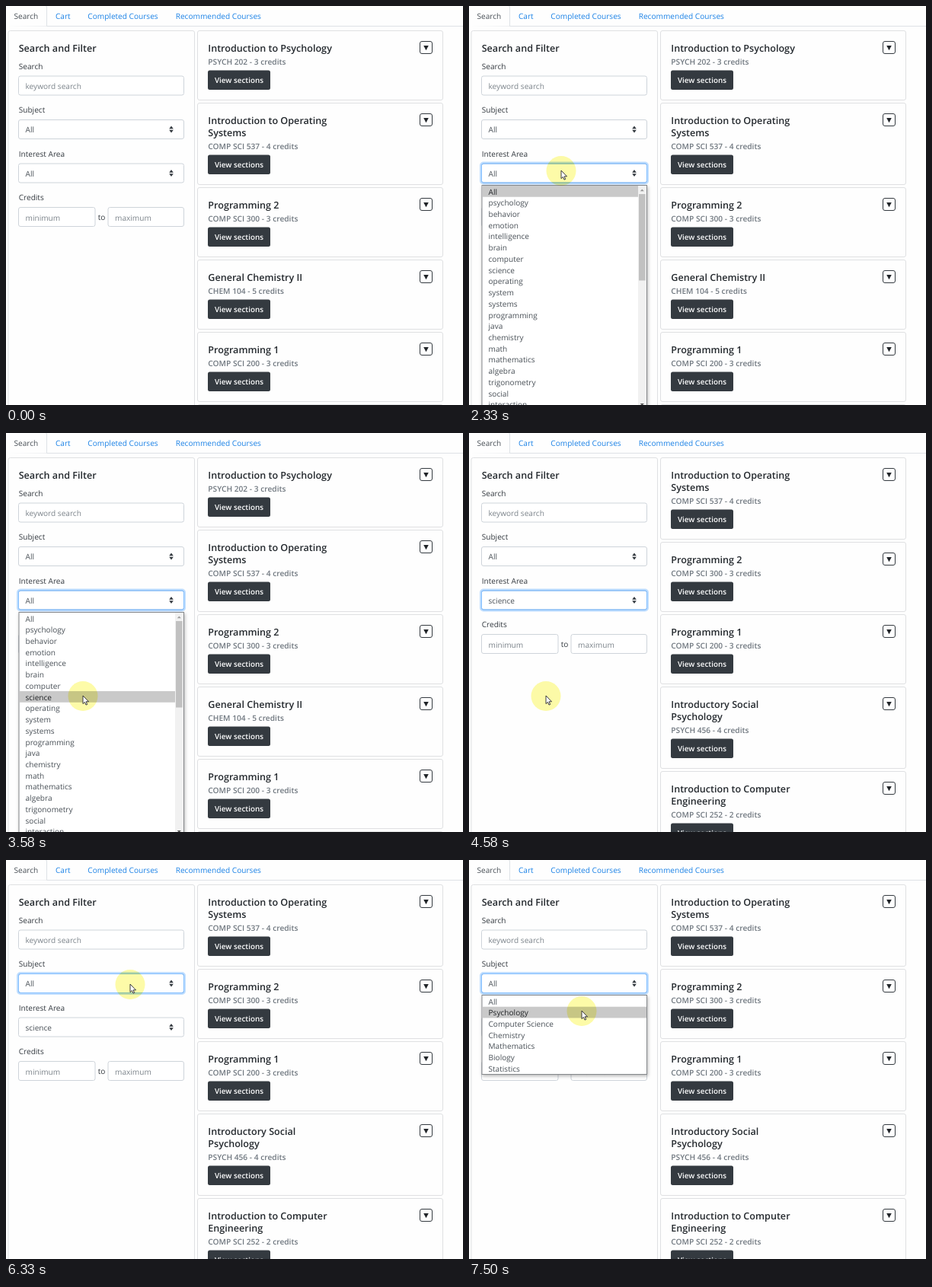
Recreate the animation shown at these times as an HTML page. Size 600 px wide and 524 px high, loop 8000 ms.

```html
<!DOCTYPE html>
<html lang="en">
<head>
<meta charset="utf-8">
<title>Course search</title>
<style>
html, body { margin: 0; width: 100%; height: 100%; overflow: hidden; background: #fefefe; }
svg { display: block; width: 600px; height: 524px; }
text { font: 10.1px "Open Sans", "Noto Sans", sans-serif; fill: #343a40; text-rendering: geometricPrecision; white-space: pre; }
.link { fill: #1b82e6; }
.soft { fill: #495057; }
.hint { fill: #7b838a; }
.head { font-size: 12.6px; font-weight: 600; fill: #24292e; }
.code { font-size: 10.2px; font-weight: 600; fill: #6f777f; }
.btn { font-size: 9.85px; font-weight: 600; fill: #fff; }
.card { fill: #fefefe; stroke: #dfe0e2; }
.field { fill: #fff; stroke: #ced4da; }
.list { filter: drop-shadow(1px 2px 2px rgba(0, 0, 0, .28)); }
</style>
</head>
<body>
<svg id="stage" viewBox="0 0 600 524"></svg>
<script>
const LOOP = 8000, TICK = 1000 / 12, ROW = 14.72;
const NS = "http://www.w3.org/2000/svg";
const stage = document.getElementById("stage");

function add(parent, tag, attrs, content) {
  const el = document.createElementNS(NS, tag);
  for (const key in attrs) el.setAttribute(key, attrs[key]);
  if (content !== undefined) el.textContent = content;
  parent.append(el);
  return el;
}
const group = (parent, attrs) => add(parent, "g", attrs);
const text = (parent, x, y, content, cls = "") => add(parent, "text", { x, y, class: cls }, content);
const rect = (parent, x, y, width, height, attrs) => add(parent, "rect", { x, y, width, height, ...attrs });
const path = (parent, d, attrs) => add(parent, "path", { d, ...attrs });
const show = (el, on) => el.setAttribute("visibility", on ? "visible" : "hidden");

function drawTabs() {
  path(stage, "M0 26.5H600", { stroke: "#dee2e6" });
  path(stage, "M-1 27V-1H50.5Q53.5 -1 53.5 2V26.5", { stroke: "#dee2e6", fill: "#fefefe" });
  text(stage, 10.5, 17, "Search", "soft");
  text(stage, 65, 17, "Cart", "link");
  text(stage, 107.3, 17, "Completed Courses", "link");
  text(stage, 222.7, 17, "Recommended Courses", "link");
}

function drawInput(x, y, w, hint) {
  rect(stage, x, y, w, 25, { rx: 2.5, class: "field" });
  text(stage, x + 9, y + 17, hint, "hint");
}

function drawSelect(y) {
  rect(stage, 16.5, y, 217, 25, { rx: 2.5, class: "field" });
  const ring = group(stage, {});
  rect(ring, 15.5, y - 1, 219, 27, { rx: 3.5, fill: "none", stroke: "#007bff", "stroke-opacity": .25, "stroke-width": 3 });
  rect(ring, 16.5, y, 217, 25, { rx: 2.5, fill: "none", stroke: "#80bdff" });
  const value = text(stage, 25.5, y + 16.7, "All", "soft");
  path(stage, `M214.2 ${y + 11.7}l2.8 -3.6 2.8 3.6zM214.2 ${y + 13.3}l2.8 3.6 2.8 -3.6z`, { fill: "#343a40" });
  return { ring, value };
}

function drawCard(parent, top, [lines, code]) {
  const extra = (lines.length - 1) * 16;
  const card = group(parent, { transform: `translate(0 ${top})` });
  rect(card, 251.5, 0, 322, 91 + extra, { rx: 2.5, class: "card" });
  lines.forEach((line, i) => text(card, 265.3, 27.2 + i * 16.3, line, "head"));
  text(card, 265.3, 44.5 + extra, code, "code");
  rect(card, 265, 52 + extra, 82, 25.5, { rx: 2.5, fill: "#343a40" });
  text(card, 274, 68.6 + extra, "View sections", "btn");
  rect(card, 543.5, 14, 16, 16, { rx: 2.5, fill: "#fff", stroke: "#343a40" });
  path(card, "M548.2 19.6h6.6l-3.3 6.2z", { fill: "#212529" });
  return top + 95 + extra;
}

function drawCourses(courses) {
  const column = group(stage, {});
  courses.reduce((top, course) => drawCard(column, top, course), 32.5);
  return column;
}

function drawList(top, height, names, barred) {
  const box = group(stage, {});
  rect(box, 17, top, 216.5, height, { fill: "#fff", stroke: "#85888b", class: "list" });
  const mark = rect(box, 17.5, 0, barred ? 204.5 : 215.5, ROW, { fill: "#c9c9c9" });
  const rows = names.map((name, i) => text(box, 25.5, top + 12.1 + i * ROW, name, "soft"));
  if (barred) {
    rect(box, 222, top + .5, 11, height, { fill: "#f1f1f1" });
    rect(box, 223, 247, 8.5, 113.5, { fill: "#c1c1c1" });
    path(box, "M224.8 243.3h5l-2.5 -2.8z", { fill: "#9a9a9a" });
    path(box, "M224.8 522h5l-2.5 2.8z", { fill: "#505050" });
  }
  return { box, mark, rows, top };
}

function updateList(list, open, y) {
  show(list.box, open);
  const hover = Math.min(list.rows.length - 1, Math.max(0, Math.floor((y - list.top) / ROW)));
  list.mark.setAttribute("y", list.top + .5 + hover * ROW);
  list.rows.forEach((row, i) => row.style.fill = i === hover ? "#202326" : "");
}

const systems = [["Introduction to Operating", "Systems"], "COMP SCI 537 - 4 credits"];
const second = [["Programming 2"], "COMP SCI 300 - 3 credits"];
const first = [["Programming 1"], "COMP SCI 200 - 3 credits"];
const social = [["Introductory Social", "Psychology"], "PSYCH 456 - 4 credits"];
const engineering = [["Introduction to Computer", "Engineering"], "COMP SCI 252 - 2 credits"];

drawTabs();
rect(stage, 3, 32.5, 244.5, 520, { rx: 2.5, class: "card" });
text(stage, 16.7, 59.7, "Search and Filter", "head");
text(stage, 16.7, 82.6, "Search");
text(stage, 16.7, 140.2, "Subject");
text(stage, 16.7, 197.7, "Interest Area");
text(stage, 16.7, 255.2, "Credits");
text(stage, 120.7, 280.7, "to");
drawInput(16.5, 92, 217, "keyword search");
drawInput(16.5, 264.5, 100.5, "minimum");
drawInput(134, 264.5, 99.5, "maximum");
const subject = drawSelect(149.5);
const interest = drawSelect(207);

const allCourses = drawCourses([
  [["Introduction to Psychology"], "PSYCH 202 - 3 credits"], systems, second,
  [["General Chemistry II"], "CHEM 104 - 5 credits"], first, social
]);
const scienceCourses = drawCourses([systems, second, first, social, engineering]);

const interestList = drawList(235.5, 300, ("All psychology behavior emotion intelligence brain computer " +
  "science operating system systems programming java chemistry math mathematics algebra " +
  "trigonometry social interaction").split(" "), true);
const subjectList = drawList(177.5, 104, ["All", "Psychology", "Computer Science", "Chemistry",
  "Mathematics", "Biology", "Statistics"], false);

const pointer = group(stage, {});
pointer.style.mixBlendMode = "normal";
const halo = add(stage, "circle", { r: 19.5, fill: "#fdfba8" });
halo.style.mixBlendMode = "multiply";
stage.append(pointer);
path(pointer, "M0 0V10.6L2.4 8.4 4 12.1 5.7 11.4 4.1 7.8H7.5Z",
  { fill: "#fff", stroke: "#26262a", "stroke-width": .9, "stroke-linejoin": "round" });

// Pointer stops: tick, x, y
const stops = [
  [7, 264, 31], [8, 205, 68], [9, 161, 96], [11, 161, 96], [12, 153, 128], [13, 134, 190],
  [14, 124.5, 217], [16, 122, 219], [20, 122, 219], [28, 121, 216], [33, 121, 216],
  [35, 119, 228], [38, 110, 285], [41, 102, 336], [43, 101, 345], [63, 101, 345],
  [64, 122, 290], [65, 156, 205], [66, 171, 168], [69, 166, 165], [73, 163, 163],
  [78, 163, 163], [81, 159, 171], [85, 151, 194], [88, 148, 199], [90, 148, 198]
];

function pointerAt(tick) {
  const next = stops.findIndex(s => s[0] > tick);
  if (next <= 0) return (next ? stops[stops.length - 1] : stops[0]).slice(1);
  const a = stops[next - 1], b = stops[next];
  const k = (tick - a[0]) / (b[0] - a[0]);
  return [a[1] + (b[1] - a[1]) * k, a[2] + (b[2] - a[2]) * k];
}

const fade = (t, start) => Math.min(1, Math.max(0, (t - start) / 150));

function render(t) {
  // A few ms of slack absorb the rounding of the 12 fps clock.
  const tick = Math.floor((t + 4) / TICK), now = tick * TICK;
  const [x, y] = pointerAt(tick);
  const filtered = tick >= 51;

  show(allCourses, !filtered);
  show(scienceCourses, filtered);
  interest.value.textContent = filtered ? "science" : "All";
  interest.ring.setAttribute("opacity", fade(now, 1700) - fade(now, 6120));
  subject.ring.setAttribute("opacity", fade(now, 6120));
  updateList(interestList, tick >= 24 && !filtered, y);
  updateList(subjectList, tick >= 77, y);

  show(pointer, tick >= 7);
  show(halo, tick >= 7);
  pointer.setAttribute("transform", `translate(${x} ${y})`);
  halo.setAttribute("cx", x);
  halo.setAttribute("cy", y + .5);
}

const start = performance.now();
function loop() {
  render((performance.now() - start) % LOOP);
  requestAnimationFrame(loop);
}
loop();
</script>
</body>
</html>
```
